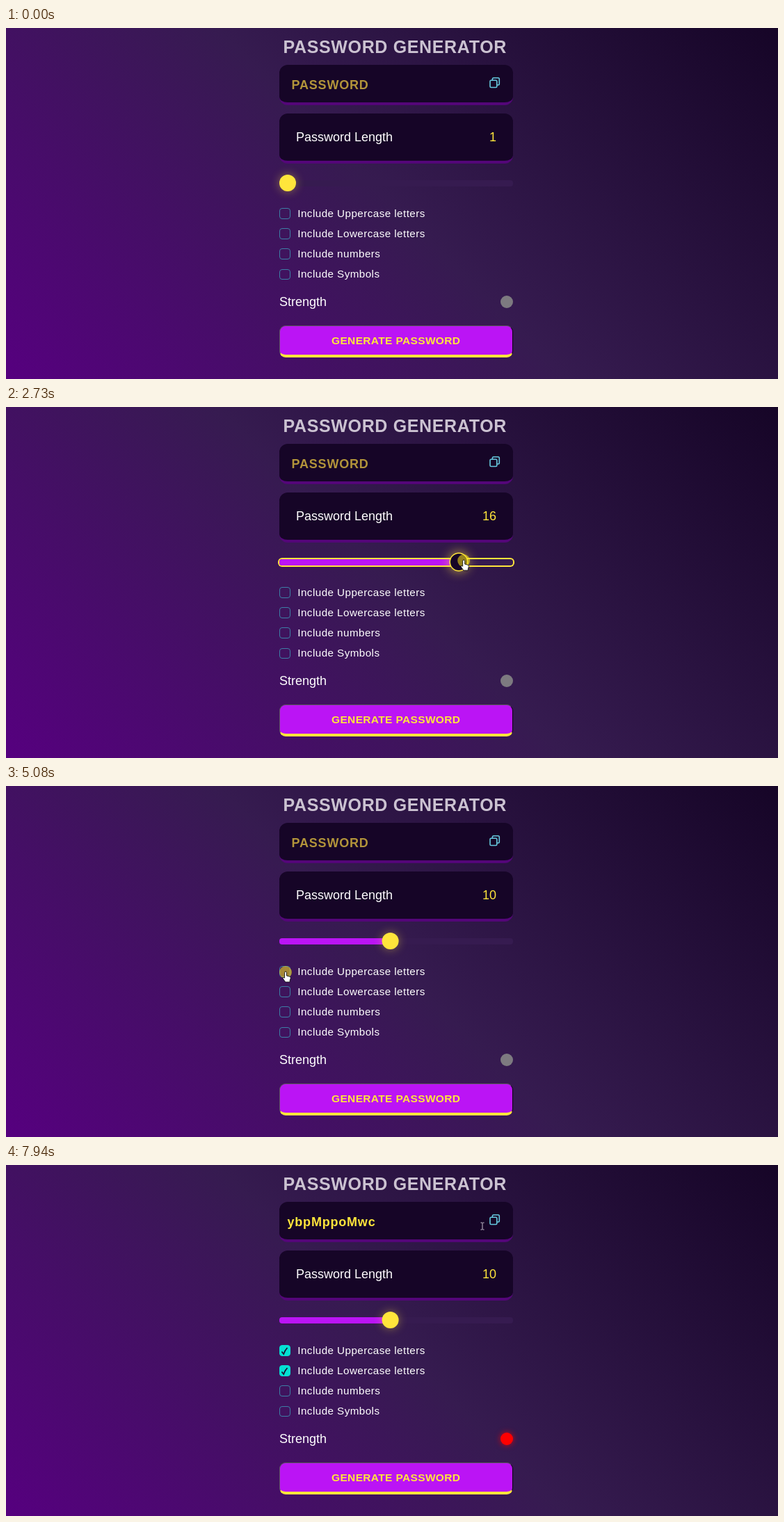
Write an HTML page that moves like this. It is 1110 by 505 pixels and loops after 8 s.

```html
<!DOCTYPE html>
<html lang="en">
<head>
<meta charset="utf-8">
<title>Password generator</title>
<style>
:root { --dark: #160527; --mid: #361b50; --violet: #bb14f5; --yellow: #ffe53b; }
html, body { margin: 0; width: 100%; height: 100%; overflow: hidden; background: var(--dark); }
#stage {
  position: relative; width: 1110px; height: 505px; overflow: hidden;
  background: linear-gradient(45deg, #56007f, var(--mid), var(--dark));
}
#stage > * { position: absolute; box-sizing: border-box; }
.panel {
  left: 393px; width: 335.5px; border-radius: 12px;
  background: var(--dark); border-bottom: 4px solid #540679;
}
#track { left: 393px; top: 219px; width: 335.5px; height: 9px; border-radius: 4px; background: var(--mid); }
#track.focus { box-shadow: 0 0 0 2px var(--yellow); }
#fill { height: 100%; border-radius: 4px 0 0 4px; background: var(--violet); }
#thumb {
  left: -12px; top: 210.5px; width: 24px; height: 24px; border-radius: 50%;
  background: var(--yellow); box-shadow: 0 0 14px rgba(255, 229, 59, .42);
}
#thumb.hot {
  background: var(--dark);
  box-shadow: 0 0 0 1.5px var(--yellow), 0 0 16px 2px rgba(255, 229, 59, .65);
}
.box { left: 393px; width: 15.5px; height: 15.5px; border: 1px solid #3d7fa6; border-radius: 4px; }
.box.on { background: #05e0d3; border-color: #05e0d3; }
.box svg { display: none; position: absolute; left: -1px; top: -1px; }
.box.on svg { display: block; }
#dot { left: 710.5px; top: 384.5px; width: 18px; height: 18px; border-radius: 50%; background: #7d7a80; }
#dot.weak { background: #f00; box-shadow: 0 0 9px rgba(255, 0, 0, .75); }
#button {
  left: 393px; top: 428px; width: 335.5px; height: 46px; border-radius: 9px;
  background: var(--violet); border: solid; border-width: 1px 1px 4px;
  border-color: #5c5560 #0a0410 var(--yellow) #5c5560;
}
#button.hover { background: #000; }
#art { left: 0; top: 0; }
text { font-family: "Liberation Sans", Arial, sans-serif; font-size: 18px; fill: #fff; }
.bold { font-weight: bold; letter-spacing: .8px; fill: var(--yellow); }
.title { font-size: 25px; letter-spacing: .65px; fill: #cbc2d1; }
.action { font-size: 15.5px; letter-spacing: .35px; }
.label { font-size: 15.2px; letter-spacing: .45px; }
</style>
</head>
<body>
<div id="stage">
  <div class="panel" style="top:53px;height:57.5px"></div>
  <div class="panel" style="top:123px;height:72px"></div>
  <div id="track"><div id="fill"></div></div>
  <div id="thumb"></div>
  <div id="dot"></div>
  <div id="button"></div>
  <svg id="art" width="1110" height="505">
    <text class="bold title" x="398.5" y="35.5">PASSWORD GENERATOR</text>
    <text id="password" class="bold" y="88"></text>
    <g fill="none" stroke="#66c9df" stroke-width="1.6">
      <rect x="696" y="75.3" width="9.8" height="10.2" rx="1.5"/>
      <path d="M699.4 75v-1.5q0-1.7 1.7-1.7h6.5q1.7 0 1.7 1.7v6.8q0 1.7-1.7 1.7h-1.6"/>
    </g>
    <text x="417" y="163">Password Length</text>
    <text id="length" x="705" y="163" text-anchor="end" style="fill:var(--yellow)"></text>
    <text x="393" y="399.5">Strength</text>
    <text class="bold action" x="468" y="454.5">GENERATE PASSWORD</text>
    <g id="cursor">
      <circle id="press" r="9" fill="#ffe81a" fill-opacity=".55"/>
      <g fill="#fff" stroke="#000" stroke-width=".8" stroke-linejoin="round">
        <path id="arrow" d="M0 0V15.5L3.6 12 6 17.4 8.4 16.4 6 11.2H11Z"/>
        <path id="hand" d="M-1.5 .5a1.5 1.5 0 0 1 3 0V5L6 6.2Q7.5 6.6 7.3 8.3L6.2 12V14H-.3L-4 8.8Q-4.3 7.3-3 7.3L-1.5 8.2Z"/>
      </g>
      <path id="beam" d="M-2.5-5H-.6L0-4.4.6-5H2.5M0-4.4V4.4M-2.5 5H-.6L0 4.4.6 5H2.5" fill="none" stroke="#c9c4cf"/>
    </g>
  </svg>
</div>
<script>
const LOOP = 8000;
const ENTER = 790, GRAB = 1660, DROP = 4150;
const CLICK_UPPER = [4960, 5150], CLICK_LOWER = [5540, 5670], CLICK_BUTTON = [6740, 7010];
const presses = [[GRAB, DROP], CLICK_UPPER, CLICK_LOWER, CLICK_BUTTON];

const $ = id => document.getElementById(id);
const within = (v, [from, to]) => v >= from && v < to;
const show = (id, on) => { $(id).style.display = on ? "" : "none"; };
const toggle = (id, name, on) => $(id).classList.toggle(name, on);

const labels = ["Uppercase letters", "Lowercase letters", "numbers", "Symbols"];
const boxes = labels.map((name, i) => {
  const y = 259 + i * 29.2;
  const box = document.createElement("div");
  box.className = "box";
  box.style.top = y + "px";
  box.innerHTML = '<svg width="16" height="16"><path d="M3.5 9.5L6.2 13Q8 7.5 11.5 4" fill="none" stroke="#1a0a2c" stroke-width="1.7"/></svg>';
  $("stage").insertBefore(box, $("art"));
  $("cursor").insertAdjacentHTML("beforebegin",
    `<text class="label" x="419.3" y="${y + 12.7}">Include ${name}</text>`);
  return box;
});

// Eased pointer moves
const moves = [
  { from: ENTER, to: 1590, x: 408, y: 220 },
  { from: GRAB, to: 2050, x: 510, y: 218 },
  { from: 2050, to: 2460, x: 492, y: 222 },
  { from: 2460, to: 2790, x: 672, y: 221 },
  { from: 2790, to: 3290, x: 630, y: 222 },
  { from: 3800, to: 3925, x: 548, y: 231 },
  { from: DROP, to: 4600, x: 388, y: 288 },
  { from: 4600, to: 4880, x: 402, y: 268 },
  { from: 5180, to: 5340, x: 402, y: 289 },
  { from: 5810, to: 6690, x: 450, y: 430 },
  { from: 7470, to: 7940, x: 685, y: 88 }
];
const clamp = (v, low, high) => Math.min(high, Math.max(low, v));
const ease = k => (1 - Math.cos(Math.PI * clamp(k, 0, 1))) / 2;

function pointer(t) {
  let x = 931, y = 492;
  for (const m of moves) {
    const k = ease((t - m.from) / (m.to - m.from));
    x += (m.x - x) * k;
    y += (m.y - y) * k;
  }
  return { x, y };
}

function drawSlider(t) {
  const step = 16.4, first = 405;
  const steps = Math.round((pointer(clamp(t, GRAB, DROP)).x - first) / step);
  const thumbX = first + steps * step;
  $("length").textContent = steps + 1;
  $("thumb").style.transform = `translateX(${thumbX}px)`;
  $("fill").style.width = (steps ? thumbX - 393 : 0) + "px";
  toggle("thumb", "hot", within(t, [GRAB - 100, DROP]));
  toggle("track", "focus", within(t, [GRAB, CLICK_UPPER[0]]));
}

function drawResult(done) {
  const password = $("password");
  password.textContent = done ? "ybpMppoMwc" : "PASSWORD";
  password.setAttribute("x", done ? 404.5 : 410.5);
  password.style.fill = done ? "" : "#b2943a";
  toggle("dot", "weak", done);
}

function drawCursor(t) {
  const { x, y } = pointer(t);
  const down = presses.some(p => within(t, p));
  const inColumn = within(x, [393, 729]);
  const onButton = inColumn && within(y, [428, 474]);
  const onSlider = inColumn && within(y, [211, 235]);
  const onBox = within(x, [393, 409]) && boxes.some(b => within(y - b.offsetTop, [-1, 16]));
  const hand = down || onButton || onSlider || onBox;
  const beam = inColumn && within(y, [53, 107]);
  toggle("button", "hover", onButton);
  show("cursor", t >= ENTER);
  show("press", down);
  show("hand", hand);
  show("beam", beam);
  show("arrow", !hand && !beam);
  $("cursor").setAttribute("transform", `translate(${x} ${y})`);
}

const start = performance.now();
function tick() {
  const t = (performance.now() - start) % LOOP;
  drawSlider(t);
  boxes[0].classList.toggle("on", t >= CLICK_UPPER[1]);
  boxes[1].classList.toggle("on", t >= CLICK_LOWER[1]);
  drawResult(t >= CLICK_BUTTON[1]);
  drawCursor(t);
  requestAnimationFrame(tick);
}
tick();
</script>
</body>
</html>
```
